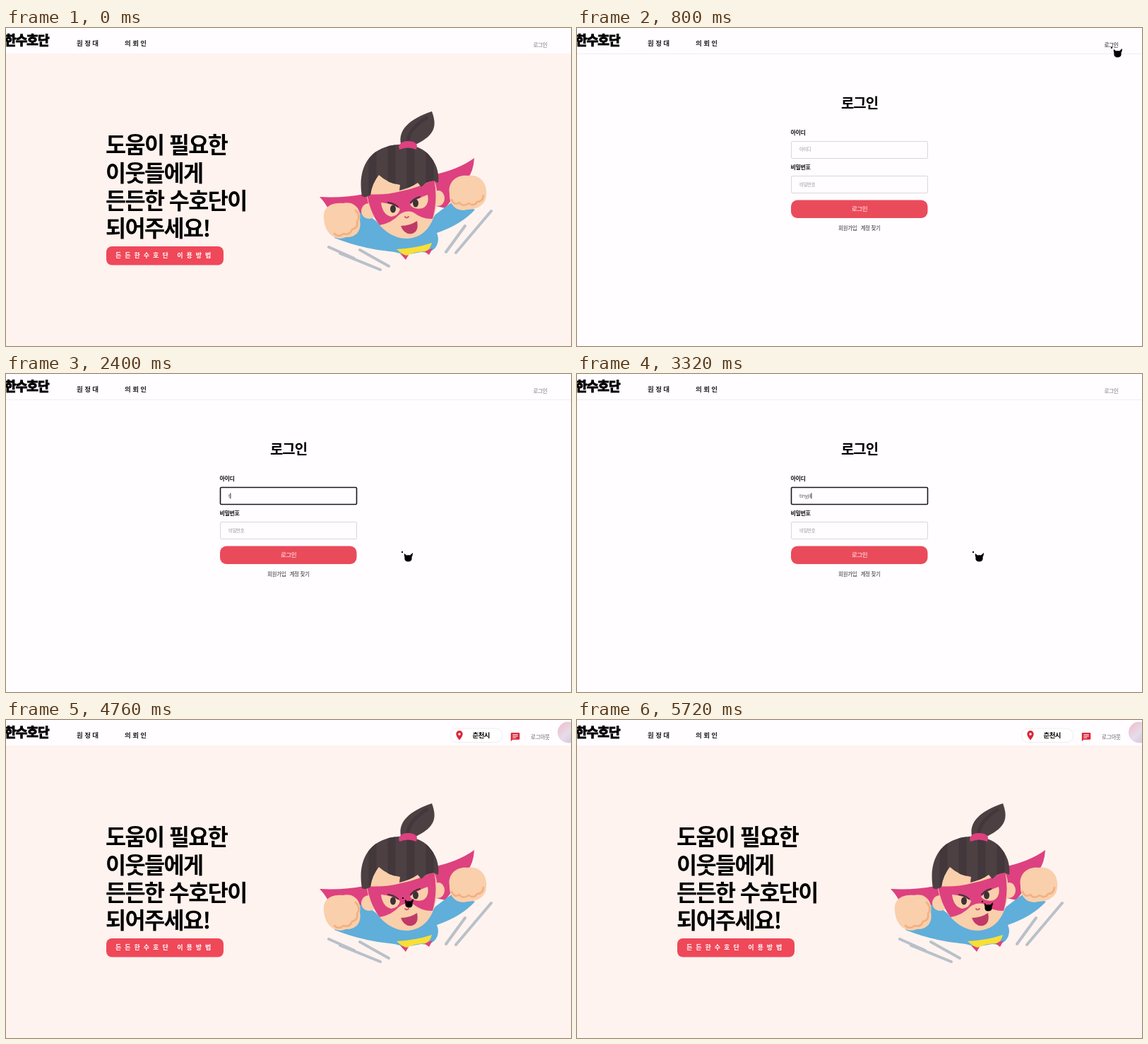
Animation, 800 px wide and 450 px high, one loop 5760 ms. Source, as an HTML page:

```html
<!DOCTYPE html>
<html lang="ko">
<head>
<meta charset="utf-8">
<style>
  html, body { margin: 0; width: 100%; height: 100%; overflow: hidden; background: #fffdff; }
  svg { display: block; width: 800px; height: 450px; }
  text { font-family: "Noto Sans CJK KR", "Noto Sans CJK", sans-serif; letter-spacing: -.05em; }
  .bold { font-weight: 700; }
  .mid { text-anchor: middle; }
  .nav { font-size: 9.5px; letter-spacing: 2.4px; fill: #222; }
  .hint { font-size: 6.4px; fill: #999; }
  .typed { font-family: "Noto Sans", sans-serif; letter-spacing: 0; fill: #555; }
  .field { fill: #fffdff; stroke: #d9d7da; }
  .field.focus { stroke: #17171c; stroke-width: 1.6; }
  .pink { fill: #de417f; }
  .skin { fill: #f9cfac; }
  .blue { fill: #60aeda; }
  .hair { fill: #4d4043; }
  .finger { fill: none; stroke: #f3b080; stroke-width: 2.6; stroke-linecap: round; stroke-linejoin: round; }
</style>
</head>
<body>
<svg viewBox="0 0 800 450">
  <defs>
    <clipPath id="dome"><path id="hairShape" d="M504 238C500 214 504 193 519 179C536 163 574 159 594 175C608 187 614 203 612 219L605 216Q595 217 588 225L583 219Q573 226 557 230L558 222Q541 220 528 208Q518 220 516 236Q510 241 504 238Z"/></clipPath>
    <linearGradient id="face" x2="1" y2="1">
      <stop stop-color="#efb9c6"/><stop offset=".5" stop-color="#e6dcea"/><stop offset="1" stop-color="#cdbcd9"/>
    </linearGradient>
  </defs>
  <rect width="800" height="450" fill="#fffdff"/>

  <g id="home">
    <rect y="36" width="800" height="414" fill="#fef3ef"/>
    <g class="bold" font-size="31.6">
      <text x="141" y="177">도움이 필요한</text>
      <text x="141" y="216.5">이웃들에게</text>
      <text x="141" y="256">든든한 수호단이</text>
      <text x="141" y="295">되어주세요!</text>
    </g>
    <rect x="142" y="309" width="166" height="26.5" rx="8" fill="#ef4859"/>
    <text class="bold" x="155" y="325.4" font-size="9" fill="#fff" style="letter-spacing:5px">든든한수호단 이용방법</text>

    <path d="M457 310L493 326M501 314L542 337M473 319L530 342M650 280L623 317M687 259L637 318" stroke="#b9c0c9" stroke-width="4" stroke-linecap="round"/>
    <path class="pink" d="M444 239Q478 241 512 234L530 265L475 264L457 258Q453 248 444 239ZM600 209Q640 201 663 184Q662 203 653 214L622 255L600 250Z"/>
    <path class="blue" d="M494 259L515 266L545 290L590 288L608 264L632 246L664 257Q645 278 610 290Q615 302 607 312Q600 319 588 317L566 321L550 317Q505 313 465 297Z"/>
    <path class="pink" d="M558 319L570 321L566 328ZM592 316L604 312L599 321Z"/>
    <path d="M553 313Q579 312 603 304Q601 313 594 316Q580 316 567 322Q560 320 553 313Z" fill="#f8df35"/>
    <path class="skin" d="M450 269C448 253 462 246 477 248C493 244 504 257 501 272C504 286 496 297 481 296C469 302 451 293 450 269Z"/>
    <path class="finger" d="M495 258Q503 266 497 274Q499 283 490 285Q487 294 478 291Q471 297 465 291"/>
    <path class="skin" d="M628 235C625 219 637 207 654 209C670 206 682 220 680 236C680 250 667 257 653 257C639 261 627 251 628 235Z"/>
    <path class="finger" d="M631 243Q635 252 642 247Q647 254 655 248Q663 253 667 246Q675 246 676 237"/>

    <circle class="skin" cx="514" cy="259" r="11"/>
    <ellipse class="skin" cx="612" cy="241" rx="9" ry="11"/>
    <path class="skin" d="M510 225Q511 199 560 197Q609 197 610 232C612 264 600 296 569 298C538 299 510 267 510 225Z"/>
    <path class="pink" d="M511 235Q536 237 559 231Q585 226 606 214Q612 242 604 270Q590 271 577 261Q567 257 557 264Q546 276 529 279Q515 260 511 235Z"/>
    <path class="skin" d="M531 247Q546 248 558 256Q556 266 545 267Q533 264 531 247ZM572 250Q582 241 597 236Q600 250 590 255Q578 258 572 250Z"/>
    <g fill="#3e3337">
      <ellipse cx="548" cy="256" rx="4" ry="5.500"/>
      <ellipse cx="580" cy="248" rx="4" ry="5.500"/>
    </g>
    <path d="M541 247Q549 248 555 253M573 247Q578 241 586 239" fill="none" stroke="#3e3337" stroke-width="2" stroke-linecap="round"/>
    <path d="M565 267Q567 270 570 267" fill="none" stroke="#d95077" stroke-width="2" stroke-linecap="round"/>
    <path d="M559 280Q572 280 582 273Q585 288 575 291Q564 293 559 280Z" fill="#c03a67"/>

    <use href="#hairShape" class="hair"/>
    <path clip-path="url(#dome)" d="M519 165V245M546 160V235M573 160V235M600 165V235" stroke="#42373a" stroke-width="11"/>
    <path class="hair" d="M559 164C555 144 571 129 603 118C610 137 609 151 580 165Z"/>
    <path d="M569 160Q570 143 597 126" fill="none" stroke="#42373a" stroke-width="5"/>
    <path class="pink" d="M556 167Q560 159 570 160Q580 160 582 166L581 172Q569 167 557 172Z"/>
  </g>

  <g id="login">
    <path d="M0 36.5H800" stroke="#eeecef"/>
    <text class="bold mid" x="400" y="113.5" font-size="20">로그인</text>
    <g class="bold" font-size="8" fill="#111">
      <text x="302.6" y="151">아이디</text>
      <text x="302.6" y="200">비밀번호</text>
    </g>
    <rect id="idBox" class="field" x="303.5" y="160.5" width="193" height="24" rx="1.5"/>
    <rect id="pwBox" class="field" x="303.5" y="209.5" width="193" height="24" rx="1.5"/>
    <text id="idHint" class="hint" x="315" y="174.4">아이디</text>
    <text id="pwHint" class="hint" x="315" y="224.2">비밀번호</text>
    <text id="idText" class="typed" x="315" y="174.6" font-size="6.5"></text>
    <text id="pwText" class="typed" x="315" y="225" font-size="7" style="fill:#111"></text>
    <path id="caret" d="M0-4V4" stroke="#111" stroke-width=".9"/>
    <rect x="303" y="243.5" width="193.5" height="25.5" rx="9" fill="#ea4b5a"/>
    <text class="mid" x="400" y="259.3" font-size="8.5" fill="#fff">로그인</text>
    <g font-size="7.6" fill="#333">
      <text x="370" y="286.4">회원가입</text>
      <text x="401.5" y="286.4">계정 찾기</text>
    </g>
  </g>

  <text class="bold" x="-2" y="23.8" font-size="18" stroke="#000" stroke-width="1.1">한수호단</text>
  <text class="nav bold" x="100" y="24.6">원정대</text>
  <text class="nav bold" x="168" y="24.6">의뢰인</text>
  <text id="signIn" x="746.5" y="26.8" font-size="7.6">로그인</text>
  <g id="member">
    <rect x="629.5" y="12" width="73" height="19.5" rx="9" fill="#fff" stroke="#efecef"/>
    <path d="M642 28.5Q637.3 23 637.3 19.8A4.7 4.7 0 0 1 646.7 19.8Q646.7 23 642 28.5Z" fill="#dc2639"/>
    <circle cx="642" cy="20" r="1.7" fill="#fff"/>
    <text class="bold" x="660.5" y="25" font-size="9.4">춘천시</text>
    <path d="M716 18H726Q727.3 18 727.3 19.2V26.6Q727.3 27.8 726 27.8H717.3L714.8 30.3V19.2Q714.8 18 716 18Z" fill="#dc2639"/>
    <path d="M717.3 20.7H724.8M717.3 22.9H724.8M717.3 25.1H722.3" stroke="#fff"/>
    <text x="743" y="26.8" font-size="7.7" fill="#666">로그아웃</text>
  </g>
  <circle id="avatar" cx="796" cy="17.5" r="15" fill="url(#face)"/>
  <path id="cursor" d="M-1-1H1V1H-1ZM3 2L6 4.5Q8.5 4 11 4.5L15 1Q15 5 13.5 7Q14.5 13.5 8.5 13.5Q2.5 13.5 3.5 7.5Q2.5 5 3 2Z"/>
</svg>
<script>
  const LOOP = 5760;
  const LOGIN_AT = 720, ID_AT = 1080, PW_AT = 3400, MEMBER_AT = 4440, HOME_AT = 4600;
  const USER = 'tinyjil', PASS = '•'.repeat(9);
  // time, x, y
  const PATH = [
    [480, 800, 46], [640, 757, 28], [820, 757, 28], [1040, 430, 173], [1200, 430, 173],
    [1560, 540, 255], [1680, 540, 255], [1840, 561, 252], [4680, 561, 252],
    [4760, 562, 252], [5000, 562, 252], [5440, 574, 257], [LOOP, 574, 257]
  ];
  const $ = id => document.getElementById(id);
  const show = (id, on) => $(id).style.display = on ? '' : 'none';

  function cursorAt(t) {
    const i = PATH.findIndex(p => p[0] > t);
    const [t0, x0, y0] = PATH[i - 1], [t1, x1, y1] = PATH[i];
    const k = (t - t0) / (t1 - t0), e = k * k * (3 - 2 * k);
    return [x0 + (x1 - x0) * e, y0 + (y1 - y0) * e];
  }

  // Number of keys pressed so far, and the time of the last one
  function typing(t, start, step, total) {
    const n = Math.max(0, Math.min(total, Math.floor((t - start) / step) + 1));
    return [n, start + (n - 1) * step];
  }

  function fill(name, value) {
    $(name + 'Text').textContent = value;
    show(name + 'Hint', !value);
  }

  function draw(t) {
    const login = t >= LOGIN_AT && t < HOME_AT;
    show('login', login);
    show('home', !login);
    show('signIn', t < MEMBER_AT);
    show('member', t >= MEMBER_AT);
    show('avatar', t >= HOME_AT);
    $('signIn').setAttribute('fill', t >= 600 && t < 860 ? '#111' : '#777');

    const [idKeys, idLast] = typing(t, 2280, 140, USER.length);
    const [pwKeys, pwLast] = typing(t, 3520, 90, PASS.length);
    fill('id', USER.slice(0, idKeys));
    fill('pw', PASS.slice(0, pwKeys));

    const onPw = t >= PW_AT, onId = t >= ID_AT && !onPw;
    $('idBox').classList.toggle('focus', onId);
    $('pwBox').classList.toggle('focus', onPw);
    const since = onPw ? (pwKeys ? pwLast : PW_AT) : (idKeys ? idLast : ID_AT);
    show('caret', login && (onId || onPw) && (t - since) % 1000 < 500);
    if (login) {
      const w = $(onPw ? 'pwText' : 'idText').getComputedTextLength();
      $('caret').setAttribute('transform', `translate(${315.5 + w} ${onPw ? 222 : 172.5})`);
    }

    show('cursor', t >= PATH[0][0]);
    if (t >= PATH[0][0]) $('cursor').setAttribute('transform', `translate(${cursorAt(t)})`);
  }

  function tick() {
    draw(performance.now() % LOOP);
    requestAnimationFrame(tick);
  }
  tick();
</script>
</body>
</html>
```
